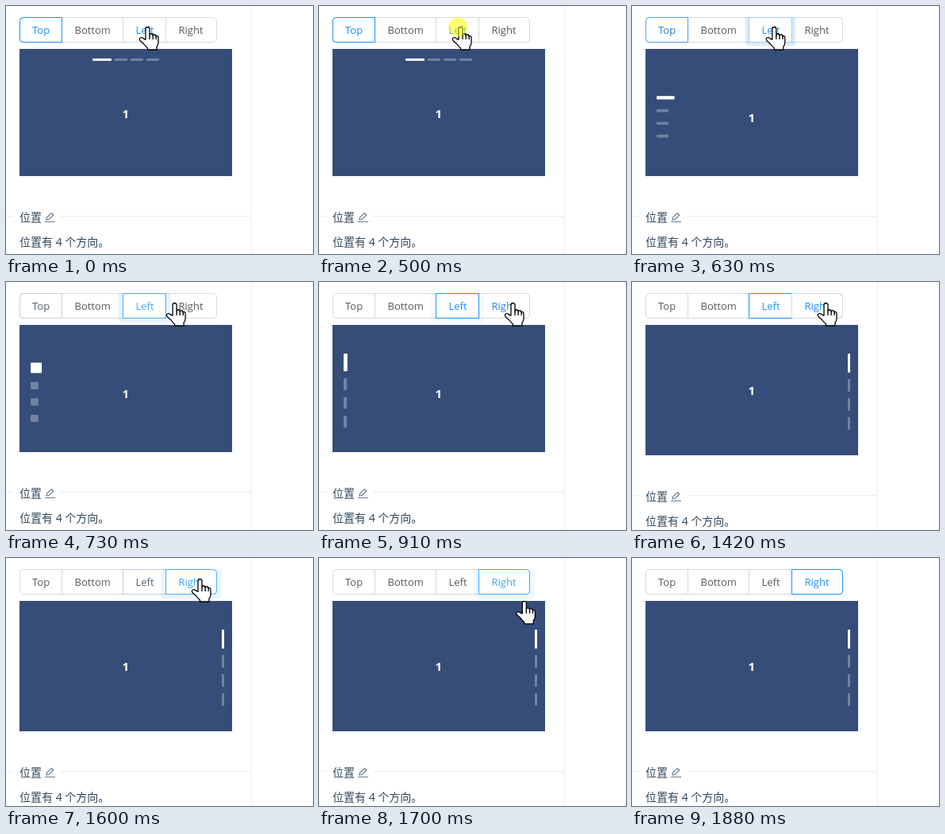
Animation, 387 px wide and 312 px high, one loop 2390 ms. Source, as an HTML page with a canvas:

```html
<!DOCTYPE html>
<html lang="zh">
<head>
<meta charset="utf-8">
<title>Carousel dot position</title>
<style>
html, body { margin: 0; width: 387px; height: 312px; overflow: hidden; background: #fff; }
canvas { display: block; }
</style>
</head>
<body>
<canvas id="stage" width="387" height="312"></canvas>
<script>
const ctx = document.getElementById('stage').getContext('2d');
const LOOP = 2390;
// The picture is held between these times.
const STEPS = [0, 500, 580, 630, 680, 730, 780, 830, 860, 910, 960, 1010, 1090, 1190,
  1420, 1470, 1520, 1560, 1600, 1650, 1700, 1740, 1790, 1840, 1880];

const BLUE = [24, 144, 255], LIGHT = [64, 169, 255], DARK = [89, 89, 89], GREY = [217, 217, 217];
const FONT = '"Open Sans", "Noto Sans CJK SC", "Noto Sans CJK", sans-serif';
const HAND = new Path2D('M8 16V3a2.5 2.5 0 0 1 5 0V11q0-2 2-2t2.200 2.200q0-1.500 2-1.200t2 2.600q0-1.300 1.500-1t1.300 2.400V20q0 3-2 5V29H10.500V27Q8 25 6 22L1 17.500Q-.5 15 1.500 14T6 15.500Z');
const PENCIL = new Path2D('M0 11.500H13M2 9L2.600 6 8.400.6 10.800 3 5 8.500Z');

function bezier(x1, y1, x2, y2) {
  const at = (a, b, u) => 3 * u * (1 - u) ** 2 * a + 3 * u * u * (1 - u) * b + u ** 3;
  return k => {
    if (k <= 0 || k >= 1) return k <= 0 ? 0 : 1;
    let lo = 0, hi = 1;
    for (let i = 0; i < 20; i++) {
      const mid = (lo + hi) / 2;
      if (at(x1, x2, mid) < k) lo = mid; else hi = mid;
    }
    return at(y1, y2, lo);
  };
}
const ease = bezier(.25, .1, .25, 1);
const inOut = bezier(.645, .045, .355, 1);
const outCirc = bezier(.08, .82, .17, 1);

const lerp = (a, b, p) => a + (b - a) * p;
const mix = (a, b, p) => a.map((v, i) => lerp(v, b[i], p));
const rgb = c => `rgb(${c.map(Math.round)})`;
const fade = (t, start) => inOut((t - start) / 300);

function rect(x, y, w, h, color) {
  ctx.fillStyle = color;
  ctx.fillRect(x, y, w, h);
}

function text(str, x, y, color, font = '13px') {
  ctx.font = `${font} ${FONT}`;
  ctx.fillStyle = color;
  ctx.fillText(str, x, y);
}

function frame(x, w, radii, color) {
  ctx.strokeStyle = color;
  ctx.lineWidth = 1;
  ctx.beginPath();
  ctx.roundRect(x + .5, 14.5, w - 1, 31, radii);
  ctx.stroke();
}

function wave(t, start, x, w) {
  if (t < start) return;
  const s = 6 * outCirc((t - start) / 400);
  ctx.save();
  ctx.beginPath();
  ctx.rect(0, 14, 387, 40);
  ctx.clip();
  ctx.beginPath();
  ctx.roundRect(x - s, 14 - s, w + 2 * s, 32 + 2 * s, s);
  ctx.rect(x, 14, w, 32);
  ctx.fillStyle = `rgba(24,144,255,${.2 * (1 - outCirc((t - start) / 2000))})`;
  ctx.fill('evenodd');
  ctx.restore();
}

function buttons(t) {
  const topOff = fade(t, 510), leftOn = fade(t, 510), leftOff = fade(t, 1400), rightOn = fade(t, 1400);
  // A checked button is lighter while the pointer is over it.
  const leftHue = mix(BLUE, LIGHT, leftOn * (1 - fade(t, 700)));
  const rightHue = mix(BLUE, LIGHT, rightOn * (1 - fade(t, 1650)));

  frame(17, 249, 4, rgb(GREY));
  for (const x of [70, 147, 201]) rect(x, 14, 1, 32, rgb(GREY));

  if (topOff < 1) frame(17, 54, [4, 0, 0, 4], rgb(mix(BLUE, GREY, topOff)));
  if (t >= 580 && leftOff < 1) frame(147, 55, 0, rgb(mix(GREY, leftHue, leftOn * (1 - leftOff))));
  if (rightOn > 0) frame(201, 65, [0, 4, 4, 0], rgb(mix(GREY, rightHue, rightOn)));
  wave(t, 580, 147, 55);
  wave(t, 1420, 201, 65);

  text('Top', 33, 35, rgb(mix(BLUE, DARK, topOff)));
  text('Bottom', 86.500, 35, rgb(DARK));
  text('Left', 163.500, 35, rgb(mix(leftHue, DARK, leftOff)));
  text('Right', 217.500, 35, rgb(mix(DARK, rightHue, fade(t, 720))));
}

function dot(x, y, w, h, active) {
  ctx.fillStyle = active ? '#fff' : 'rgba(255,255,255,.3)';
  ctx.beginPath();
  ctx.roundRect(x, y, w, h, 1);
  ctx.fill();
}

function dots(t) {
  if (t < 580) {
    dot(109, 66, 24, 3, true);
    for (const x of [137, 157, 177]) dot(x, 66, 16, 3);
    return;
  }
  // Slots grow first, the bars inside them follow.
  const slot = ease((t - 510) / 500), bar = ease((t - 590) / 500);
  const right = t >= 1420;
  const sizes = [24, 16, 16, 16];
  const slots = sizes.map(s => lerp(3, s, slot));
  let y = (right ? 138 : 136) - (slots.reduce((a, b) => a + b) + 24) / 2;
  sizes.forEach((size, i) => {
    const h = lerp(3, size, bar);
    y += slots[i];
    dot(right ? 272 : 31, y - h, lerp(size, 3, bar), h, i === 0);
    y += 8;
  });
}

function page(t) {
  const drop = t >= 1420 ? 4 : 0;
  rect(17, 54, 268, 160 + drop, '#364d79');
  text('1', 146.500, t < 580 ? 141 : drop ? 142 : 146, '#fff', 'bold 15px');
  dots(t);

  rect(309, 0, 1, 312, '#ebedf0');
  rect(0, 264 + drop, 9, 1, '#ebedf0');
  rect(68, 264 + drop, 241, 1, '#ebedf0');
  text('位置', 17, 271 + drop, '#314659', '14px');
  text('位置有 4 个方向。', 17, 302 + drop, '#314659', '14px');
  ctx.save();
  ctx.translate(49, 260 + drop);
  ctx.strokeStyle = '#697b8c';
  ctx.lineWidth = 1.2;
  ctx.stroke(PENCIL);
  ctx.restore();
}

function pointer(t) {
  if (t >= 1880) return;
  const across = inOut((t - 610) / 240);
  const leave = Math.max(0, (t - 1620) / 260) ** 2;
  const x = lerp(lerp(168, 234, across), 385, leave), y = lerp(26, 320, leave);
  ctx.save();
  ctx.translate(x, y);
  ctx.fillStyle = '#fff';
  ctx.strokeStyle = '#000';
  ctx.lineWidth = 1.3;
  ctx.lineJoin = 'round';
  ctx.fill(HAND);
  ctx.stroke(HAND);
  ctx.beginPath();
  for (const fx of [13, 17.200, 21.200]) {
    ctx.moveTo(fx, 11);
    ctx.lineTo(fx, 16);
  }
  ctx.stroke();
  if ((t >= 500 && t < 580) || (t >= 1190 && t < 1420)) {
    ctx.fillStyle = 'rgba(255,255,0,.55)';
    ctx.beginPath();
    ctx.arc(7, .5, 12, 0, 7);
    ctx.fill();
  }
  ctx.restore();
}

function draw(now) {
  const time = now % LOOP;
  const t = STEPS.filter(s => s <= time).pop() || 0;
  rect(0, 0, 387, 312, '#fff');
  page(t);
  buttons(t);
  pointer(t);
}

const begin = performance.now();
function tick() {
  draw(performance.now() - begin);
  requestAnimationFrame(tick);
}
tick();
</script>
</body>
</html>
```
